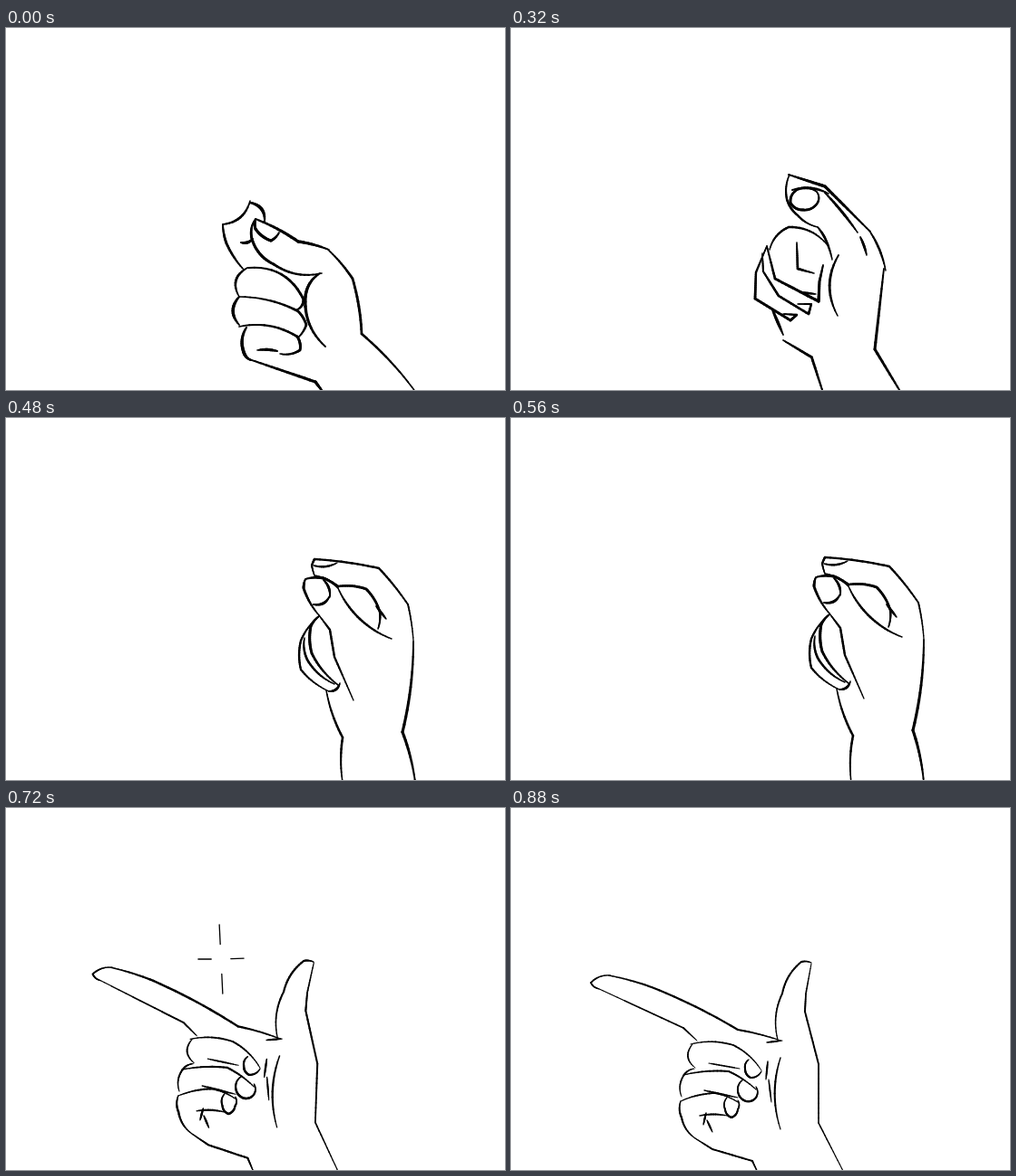
An HTML page with a canvas for the animation above (1.04 s loop, 550 by 400 pixels).

```html
<!DOCTYPE html>
<html lang="en">
<head>
<meta charset="utf-8">
<title>Finger snap</title>
<style>
html, body { margin: 0; width: 100%; height: 100%; overflow: hidden; background: #fff; }
canvas { display: block; width: 550px; height: 400px; }
</style>
</head>
<body>
<canvas id="stage" width="550" height="400"></canvas>
<script>
const ctx = document.getElementById('stage').getContext('2d');
const LOOP = 1040;

// Each line is a stroke: how far its segments bow to the left of travel
// (as a share of their length), then its key points.
const parse = text => text.trim().split('\n').map(line => {
  const [bend, ...pts] = line.split(' ');
  return { bend: +bend, pts: pts.map(p => p.split(',').map(Number)) };
});

const pinch = [...parse(`
-.17 239,217 269,191
.22 269,193 285,214
-.04 239,217 243,238 262,267
-.15 259,237 272,233
-.11 275,211 271,233 295,261 348,271
-.08 275,213 275,222 292,235 301,226
.03 275,211 322,236 356,245
.03 355,245 382,277 392,338 452,403
-.12 346,271 330,297 352,352
0 268,366 341,391 350,403`), ...parse(`
-.25 266,265 257,297
.17 267,265 328,300 319,312
-.22 257,297 257,328
.06 258,297 322,313 331,328 322,342
.1 257,330 321,341 324,356 302,360
-.05 299,357 277,356
-.12 265,331 262,358 270,367`)];

const curl = [...parse(`
-.08 337,150 334,177 346,195 368,208
0 336,150 376,163 426,213
.05 425,212 443,256
.02 376,170 412,214
.03 415,219 422,239
-.15 367,169 345,167 338,181 352,189 368,181 367,169
.1 340,167 380,171
.03 368,208 376,220 384,244
0 441,254 431,343 453,403
-.14 391,239 390,306`), ...parse(`
.12 315,233 336,208 378,227
0 345,225 346,254 364,259
0 374,250 370,268 369,290 321,265 312,229
0 349,280 366,282
0 307,237 308,257 325,284 358,304 361,293 346,293
0 312,229 300,258 299,287 338,311 345,305 330,304
0 318,299 330,327
0 330,333 361,352 365,403`)];

const tuck = parse(`
.02 346,172 343,161 346,154 417,164 449,204 455,244
.03 455,245 443,345 455,403
-.1 345,161 371,158
.06 346,172 372,184 403,187 418,212 416,231
0 414,206 425,220
-.05 336,176 334,186 351,216
.06 336,176 356,175 372,186
-.05 372,186 396,220 431,242
-.2 345,204 363,194
.12 356,177 363,196
0 351,216 363,232 368,262 389,310
-.04 359,299 377,351 375,403
-.06 351,217 342,228 343,258 372,293
-.06 350,218 331,244 331,276 362,300
-.08 335,241 338,265 368,292
-.2 362,300 374,291`);

const open = [...parse(`
-.12 110,185 88,193 97,200
.02 108,185 155,198 250,245 297,257
0 93,198 190,243 205,257
.09 294,256 299,205 320,170 331,171
0 331,172 325,205 324,225 339,283 339,348 367,403
0 282,259 299,257
0 283,280 281,300
0 284,300 287,325
-.08 297,276 297,355
0 203,365 222,377 266,390 273,405`), ...parse(`
-.25 200,261 203,287
.07 198,261 245,262 276,290
-.15 262,278 258,288 264,298 276,291
0 218,282 252,288
-.12 202,288 190,296 188,319
.04 190,295 240,291 270,311
-.15 256,300 250,313 259,324 270,320 270,308
0 213,312 250,320
-.1 187,324 188,342 203,365
.05 187,324 225,315 250,325
-.15 238,320 236,333 243,342 250,333 250,323
.05 208,340 238,340
0 215,337 212,350
0 216,345 222,358`)];

const move = (strokes, fn) => strokes.map(s => ({ bend: s.bend, pts: s.pts.map(fn) }));

const turn = (strokes, a, cx, cy) => move(strokes, ([x, y]) => [
  cx + (x - cx) * Math.cos(a) - (y - cy) * Math.sin(a),
  cy + (x - cx) * Math.sin(a) + (y - cy) * Math.cos(a)
]);

// Shifts the hand while the forearm gives way less and less.
const lean = (strokes, dx, dy) => move(strokes, ([x, y]) => {
  const f = Math.min(1, (490 - y) / 140);
  return [x + dx * f, y + dy * f];
});

const back = lean(curl, -30, 12);

// start time, strokes, brush width, spark range (inner and outer end, 0 to 1)
const steps = [
  [0, pinch, 3.2],
  [200, turn(pinch, -0.055, 430, 380), 2.9],
  [320, back, 2.9],
  [400, curl, 2.9],
  [480, lean(tuck, -6, 2), 2.8],
  [560, tuck, 2.8],
  [680, back, 2.9],
  [720, turn(open, 0.036, 355, 400), 2.2, [0.4, 0.93]],
  [760, open, 2.2, [0.7, 1]],
  [800, open, 2.2, [0.98, 1]],
  [840, open, 2.1],
  [880, open, 2]
];

function line(from, to, width) {
  ctx.lineWidth = width;
  ctx.beginPath();
  ctx.moveTo(...from);
  ctx.lineTo(...to);
  ctx.stroke();
}

function brush({ bend, pts }, width) {
  const parts = 12, n = (pts.length - 1) * parts;
  let prev = pts[0];
  for (let k = 1; k <= n; k++) {
    const i = Math.floor((k - 1) / parts);
    const [[ax, ay], [bx, by]] = [pts[i], pts[i + 1]];
    const t = k / parts - i;
    const bow = 4 * bend * t * (1 - t);
    const next = [
      ax + (bx - ax) * t + (by - ay) * bow,
      ay + (by - ay) * t - (bx - ax) * bow
    ];
    line(prev, next, Math.max(1, width * (0.55 + 0.45 * Math.sin(Math.PI * k / n))));
    prev = next;
  }
}

function spark([from, to]) {
  for (const [dx, dy] of [[-2, -41], [27, -1], [2, 41], [-27, 0]]) {
    line([237 + dx * from, 167 + dy * from], [237 + dx * to, 167 + dy * to], 1.3);
  }
}

// Repeatable pressure between 0.85 and 1.15 for stroke i
const pressure = i => 0.85 + 0.3 * (Math.abs(Math.sin(i * 12.9898) * 43758.5453) % 1);

ctx.lineCap = ctx.lineJoin = 'round';
ctx.strokeStyle = '#000';
let shown;

function frame(now) {
  const step = steps.findLast(s => s[0] <= now % LOOP) || steps[0];
  if (step !== shown) {
    shown = step;
    const [, strokes, width, range] = step;
    ctx.fillStyle = '#fff';
    ctx.fillRect(0, 0, 550, 400);
    strokes.forEach((s, i) => brush(s, width * pressure(i)));
    if (range) spark(range);
  }
  requestAnimationFrame(frame);
}
frame(0);
</script>
</body>
</html>
```
